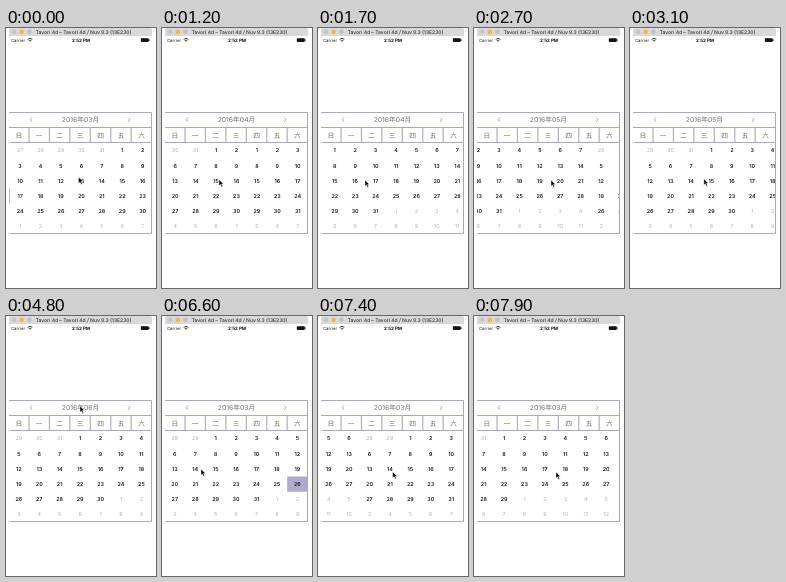
Write an HTML page that moves like this. It is 150 px wide and 260 px high and loops after 8 s.

```html
<!DOCTYPE html>
<html lang="zh">
<head>
<meta charset="utf-8">
<title>Calendar</title>
<style>
  html, body { margin: 0; width: 100%; height: 100%; overflow: hidden; background: #fff; }
  svg { display: block; width: 100vw; height: 100vh; }
  text {
    font-family: Inter, "Noto Sans CJK SC", "Noto Sans CJK JP", "Noto Sans CJK", sans-serif;
    text-anchor: middle; text-rendering: geometricPrecision;
  }
  .day { font-size: 5.4px; font-weight: 600; fill: #1a1a1a; }
  .out { font-weight: 400; fill: #b0b0b0; }
  .head { font-size: 6.8px; fill: #707070; }
  .line, .split { fill: none; stroke: #a9a6c6; }
  .split { stroke: #b3b2d6; stroke-width: 1.3; }
  .arrow { fill: none; stroke: #808080; stroke-width: .7; }
</style>
</head>
<body>
<svg id="stage" viewBox="0 0 150 260">
  <defs>
    <clipPath id="screen"><rect x="3" y="84" width="142.5" height="122.5"/></clipPath>
  </defs>
  <rect width="150" height="260" fill="#fff"/>

  <path d="M3 8V2q0-2 2-2H144q2 0 2 2V8Z" fill="#d9d9d9"/>
  <circle cx="8" cy="3.8" r="2.4" fill="#c6c6c6"/>
  <circle cx="15.8" cy="3.8" r="2.4" fill="#f4b740"/>
  <circle cx="23.5" cy="3.8" r="2.4" fill="#bcc2c6"/>
  <text x="77.5" y="5.5" font-size="5" font-weight="500" fill="#333">Tavori 4d – Tavori 4d / Nuv 9.3 (13E230)</text>

  <text x="12" y="13.9" font-size="4.3" fill="#111">Carrier</text>
  <g fill="none" stroke="#111" stroke-width=".8">
    <path d="M21.6 11.3q2.4-2 4.8 0M22.7 12.6q1.3-1 2.6 0M23.6 13.6h.8"/>
  </g>
  <text x="75" y="13.9" font-size="4.5" font-weight="700" fill="#111">2:52 PM</text>
  <rect x="134.8" y="10.2" width="8" height="3.8" rx=".7" fill="#111"/>
  <rect x="143.1" y="11.4" width=".7" height="1.4" fill="#111"/>

  <g clip-path="url(#screen)"><g id="strip"></g></g>
  <g id="frame">
    <path class="line" d="M3 84.5H145.5V205.5H3M3 99.5H145.5M3 114.5H145.5"/>
    <path class="arrow" d="M26.2 89.7L24.2 91.8L26.2 93.9M122.2 89.7L124.2 91.8L122.2 93.9"/>
    <text id="month" class="head" x="74.5" y="94.4"></text>
  </g>
  <path id="cursor" d="M0 0V6.2L1.5 4.9L2.6 7.4L3.7 6.9L2.6 4.5H4.5Z" fill="#000" stroke="#fff" stroke-width=".45"/>
</svg>
<script>
const LOOP = 8000, STEP = 100;
const LEFT = 2.6, WIDTH = 143, COL = WIDTH / 7, TOP = 114.8, ROW = 15.22;
const $ = id => document.getElementById(id);

function add(parent, tag, attrs, text) {
  const el = document.createElementNS("http://www.w3.org/2000/svg", tag);
  for (const key in attrs) el.setAttribute(key, attrs[key]);
  if (text !== undefined) el.textContent = text;
  parent.appendChild(el);
  return el;
}

// Month pages lie side by side, February (2) to June (6).
function buildPage(month) {
  const group = add($("strip"), "g", { transform: `translate(${month * WIDTH} 0)` });
  const first = new Date(2016, month - 1, 1).getDay();
  for (let i = 0; i < 42; i++) {
    const date = new Date(2016, month - 1, 1 - first + i);
    const inside = date.getMonth() === month - 1;
    const x = LEFT + (i % 7) * COL, y = TOP + Math.floor(i / 7) * ROW;
    if (month === 3 && inside && date.getDate() === 26)
      add(group, "rect", { x, y, width: COL, height: ROW, fill: "#aeabcf" });
    add(group, "text", {
      x: x + COL / 2, y: y + ROW / 2 + 1.95, class: inside ? "day" : "day out"
    }, date.getDate());
  }
}
for (let month = 2; month <= 6; month++) buildPage(month);

[..."日一二三四五六"].forEach((name, i) => {
  const x = LEFT + i * COL;
  add($("frame"), "text", { x: x + COL / 2, y: 109.6, class: "head" }, name);
  if (i) add($("frame"), "path", { class: "split", d: `M${x} 100V114` });
});

function ease(u) {
  u = Math.min(1, Math.max(0, u));
  return u * u * (3 - 2 * u);
}

// A tap on the title jumps from June back to March between the swipes.
const swipes = [
  { start: -850, time: 900, from: 3, to: 4 },
  { start: 700, time: 1110, from: 4, to: 5 },
  { start: 2500, time: 695, from: 5, to: 6 },
  { start: 5200, time: 0, from: 3, to: 3 },
  { start: 7100, time: 878, from: 3, to: 2 }
];

// Resting and turning points of the pointer: time, x, y.
const stops = [
  [0, 72.5, 149], [700, 118, 150], [1200, 57, 151.5], [1700, 47, 152],
  [2500, 107, 152], [2700, 77, 152], [3600, 69.5, 149], [4600, 74, 90],
  [5300, 74, 90], [6600, 39, 153], [7100, 35, 154], [7500, 82, 156]
];

function pointerAt(t) {
  const i = stops.findLastIndex(stop => stop[0] <= t);
  const [t0, x0, y0] = stops[i];
  const [t1, x1, y1] = stops[i + 1] ?? [LOOP, x0, y0];
  const k = ease((t - t0) / (t1 - t0));
  return [x0 + (x1 - x0) * k, y0 + (y1 - y0) * k];
}

function draw(now) {
  const t = Math.floor((now % LOOP) / STEP) * STEP;
  const { start, time, from, to } = swipes.findLast(swipe => swipe.start <= t);
  const page = from + (to - from) * ease(time ? (t - start) / time : 1);
  // The title changes only once the page has settled.
  const shown = t < start + time ? from : to;
  $("month").textContent = `2016年0${shown}月`;
  $("strip").setAttribute("transform", `translate(${-page * WIDTH} 0)`);
  $("cursor").setAttribute("transform", `translate(${pointerAt(t)})`);
}

let begin;
function tick(now) {
  begin ??= now;
  draw(now - begin);
  requestAnimationFrame(tick);
}
draw(0);
requestAnimationFrame(tick);
</script>
</body>
</html>
```
